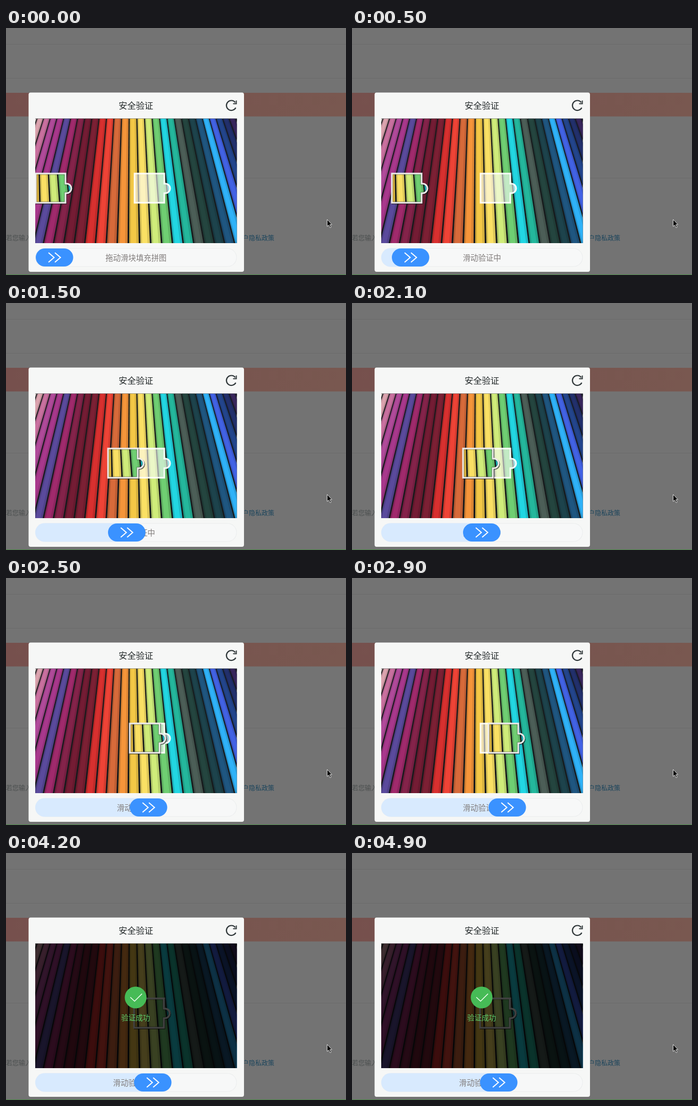
These frames come from a looping animation (640x465 px, 5000 ms). An HTML page with a canvas:

```html
<!DOCTYPE html>
<html lang="zh">
<head>
<meta charset="utf-8">
<style>
html, body { margin: 0; width: 100%; height: 100%; overflow: hidden; background: #737373; }
canvas { display: block; }
</style>
</head>
<body>
<canvas id="stage" width="640" height="465"></canvas>
<script>
const LOOP = 5000, STEP = 100, START = 300, DONE = 3400;
const FONT = '"Noto Sans CJK SC", "Noto Sans CJK", sans-serif';
const BLUE = '#3a92ff';
const HOLE = { x: 242, y: 274 };
const END = 186;
// time, slider offset
const KEYS = [[START, 0], [900, 56], [1500, 136], [2100, 153], [2900, 201], [3300, 185], [LOOP, 185]];
// pencils from left to right, the first has index -15
const PENCILS = ('f0f0ee ead9d8 dba3ae c9709f b04a9a a8388c 5a4a9c a02a6c 84234a 741c34 7c2034 ' +
  'd8302f ee4336 d76a3a f5953a f4c846 fae064 cfec7a 6fce72 22d6e2 24b79c 4c5e57 24453f 1d434c ' +
  '1f5680 2fb2f8 4262e4 23458c 22306c 38265c 1c1a38').split(' ');
const JIGSAW = new Path2D('M0 0H56V19h2a9 9 0 0 1 0 18h-2V55H0Z');

const stage = document.getElementById('stage').getContext('2d');

function rect(c, color, x, y, w, h, r = 0) {
  c.fillStyle = color;
  c.beginPath();
  c.roundRect(x, y, w, h, r);
  c.fill();
}

function line(c, color, width, d) {
  c.strokeStyle = color;
  c.lineWidth = width;
  c.stroke(new Path2D(d));
}

function text(c, str, x, y, size, color, align = 'center', weight = 400) {
  c.font = `${weight} ${size}px ${FONT}`;
  c.textAlign = align;
  c.fillStyle = color;
  c.fillText(str, x, y);
}

function layer(draw) {
  const canvas = document.createElement('canvas');
  canvas.width = 640;
  canvas.height = 465;
  draw(canvas.getContext('2d'));
  return canvas;
}

// The pencils fan out downwards from a vertical axis at x = 235.
const topX = i => 239 + 14.6 * i - 0.09 * i * Math.abs(i);
const lowX = i => 235 + (topX(i) - 235) * 1.45;

function strip(c, color, a, b) {
  c.fillStyle = color;
  c.beginPath();
  c.moveTo(topX(a), 170.5);
  c.lineTo(topX(b), 170.5);
  c.lineTo(lowX(b), 405);
  c.lineTo(lowX(a), 405);
  c.fill();
}

const picture = layer(c => {
  c.beginPath();
  c.rect(55, 170.5, 379.5, 234.5);
  c.clip();
  rect(c, '#171a1c', 55, 170, 380, 236);
  PENCILS.forEach((hex, n) => {
    const i = n - 15;
    strip(c, '#' + hex, i - 0.42, i + 0.43);
    strip(c, 'rgba(0,0,0,.16)', i - 0.42, i - 0.27);
    strip(c, 'rgba(0,0,0,.12)', i + 0.22, i + 0.43);
  });
});

const backdrop = layer(c => {
  rect(c, '#737373', 0, 0, 640, 465);
  for (const y of [30, 94, 282]) rect(c, '#6b6b6b', 0, y, 640, 1);
  const band = c.createLinearGradient(0, 0, 640, 0);
  band.addColorStop(0, '#76504d');
  band.addColorStop(1, '#795850');
  rect(c, band, 0, 122, 640, 44.5);
  text(c, '若您输入', 0, 400, 12, '#4b4f4f', 'left');
  text(c, '户隐私政策', 505, 400, 12, '#1c455c', 'right', 500);
  rect(c, '#4b8a48', 0, 464, 640, 1);

  rect(c, '#f6f7f6', 42.5, 121.5, 405.5, 337.5, 4);
  text(c, '安全验证', 244.5, 151.5, 16.3, '#222829');
  line(c, '#30383a', 2.2, 'M431.5 140A9.3 9.3 0 1 0 432.5 150');
  line(c, '#30383a', 2, 'M433.5 136.5V142.5H427.5');

  c.fillStyle = '#000';
  c.strokeStyle = '#ddd';
  c.lineWidth = 1;
  const arrow = new Path2D('M604.5 360.5V373.5L607.5 371L610 376L612 375L609.7 370H613.5Z');
  c.fill(arrow);
  c.stroke(arrow);
});

function offset(t) {
  if (t <= START) return 0;
  const k = KEYS.findIndex(key => key[0] >= t);
  const [t0, x0] = KEYS[k - 1], [t1, x1] = KEYS[k];
  return Math.round(x0 + (x1 - x0) * (t - t0) / (t1 - t0));
}

function drawHole(c) {
  c.save();
  c.translate(HOLE.x, HOLE.y);
  c.fillStyle = 'rgba(255,255,255,.58)';
  c.fill(JIGSAW);
  c.strokeStyle = 'rgba(255,255,255,.92)';
  c.lineWidth = 3;
  c.stroke(JIGSAW);
  c.restore();
}

function drawPiece(c, x) {
  c.save();
  c.translate(HOLE.x + x - END, HOLE.y);
  c.strokeStyle = 'rgba(20,20,20,.6)';
  c.lineWidth = 3;
  c.translate(1.3, 1.5);
  c.stroke(JIGSAW);
  c.translate(-1.3, -1.5);
  c.save();
  c.clip(JIGSAW);
  c.drawImage(picture, -HOLE.x, -HOLE.y);
  c.strokeStyle = 'rgba(30,30,30,.4)';
  c.lineWidth = 5;
  c.stroke(JIGSAW);
  c.restore();
  c.strokeStyle = '#eceaea';
  c.lineWidth = 3;
  c.stroke(JIGSAW);
  c.restore();
}

function drawSuccess(c) {
  rect(c, 'rgba(0,0,0,.72)', 55, 170.5, 379.5, 234.5);
  rect(c, '#46bb56', 223.5, 251.5, 41, 41, 20.5);
  line(c, '#f2fff2', 1.5, 'M234 271.5L242 279L256 265');
  text(c, '验证成功', 244, 314.5, 13.6, '#5ccb69');
}

function drawSlider(c, x, label) {
  rect(c, '#ebedee', 55, 414.5, 379.5, 35, 17.5);
  rect(c, '#f7f8f8', 56, 415.5, 377.5, 33, 16.5);
  if (x) rect(c, '#d8eafe', 55, 414.5, x + 71, 35, 17.5);
  text(c, label, 244.7, 437.5, 14.4, '#807c7b');
  rect(c, BLUE, 56 + x, 415, 70.5, 34, 17);
  c.save();
  c.translate(x, 0);
  line(c, '#fff', 2, 'M80 423L90.5 432L80 441M92 423L102.5 432L92 441');
  c.restore();
}

function draw(t) {
  const c = stage, x = offset(t), done = t >= DONE;
  c.drawImage(backdrop, 0, 0);
  c.drawImage(picture, 0, 0);
  c.save();
  c.beginPath();
  c.rect(55, 170.5, 379.5, 234.5);
  c.clip();
  drawHole(c);
  drawPiece(c, x);
  c.restore();
  if (done) drawSuccess(c);
  drawSlider(c, x, done ? '滑动验证成功' : x ? '滑动验证中' : '拖动滑块填充拼图');
}

const begin = performance.now();
function tick() {
  const t = (performance.now() - begin) % LOOP;
  draw(Math.floor(t / STEP) * STEP);
  requestAnimationFrame(tick);
}
tick();
</script>
</body>
</html>
```
